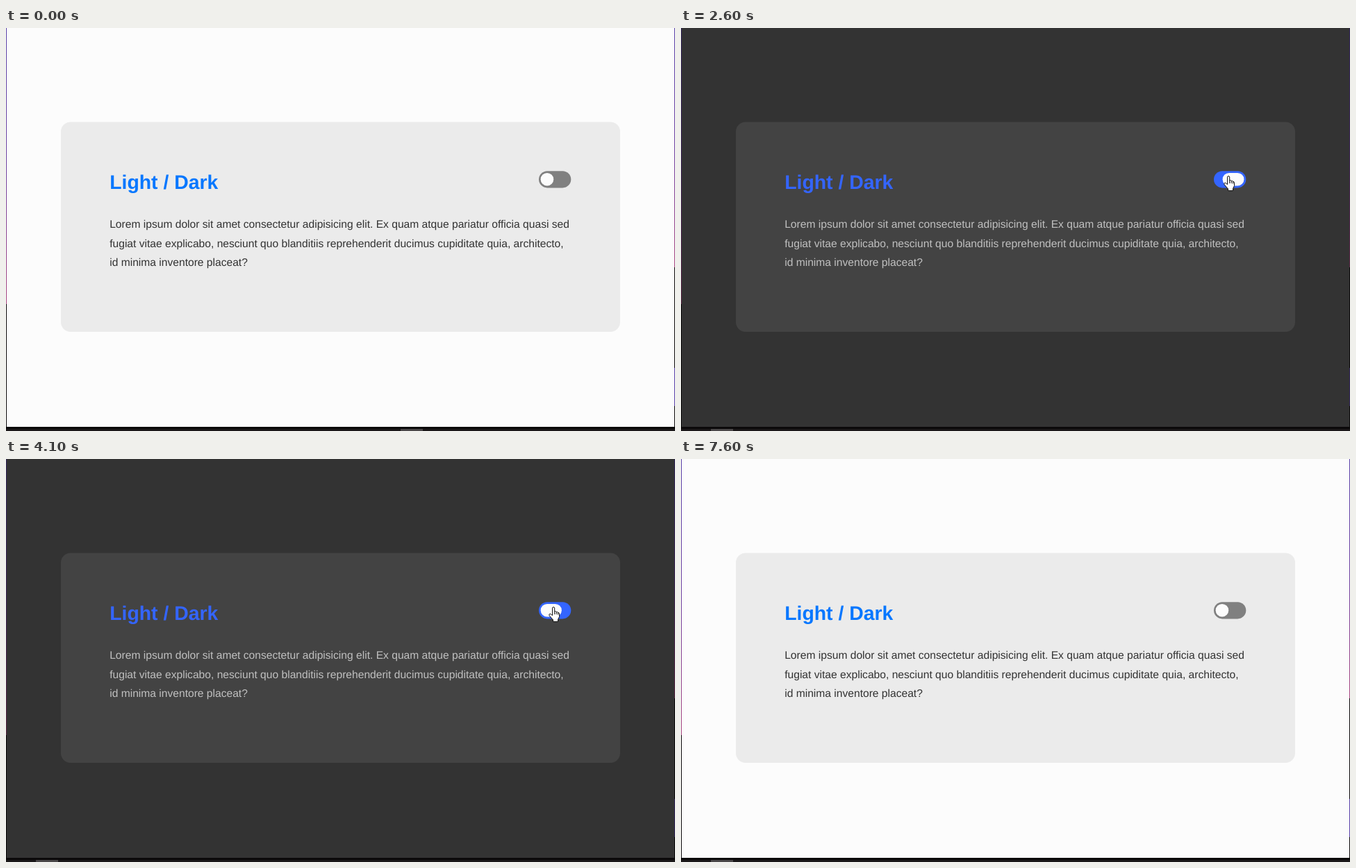
Recreate the animation shown at these times as an HTML page. Size 963 by 581 pixels, loop 7700 ms.

```html
<!DOCTYPE html>
<html lang="en">
<head>
<meta charset="utf-8">
<title>Light / Dark</title>
<style>
  html, body { margin: 0; width: 100%; height: 100%; overflow: hidden; background: #0b090a; }
  svg {
    display: block; width: 963px; height: 581px;
    --page: #fcfcfc; --card: #ebebeb; --title: #0677ff;
    --text: #333; --track: #808080; --edge: .6;
  }
  svg.idle { --edge: 1; }
  svg.dark {
    --page: #333; --card: #434343; --title: #3465ff;
    --text: #c0c0c0; --track: #3465ff; --edge: .5;
  }
  #page { fill: var(--page); }
  #card { fill: var(--card); }
  #track { fill: var(--track); }
  #thumb { fill: #fcfcfc; }
  #edges { opacity: var(--edge); }
  text { font-family: "Liberation Sans", Arial, sans-serif; text-rendering: geometricPrecision; }
  #title { font-size: 28.4px; font-weight: 700; fill: var(--title); }
  #copy { font-size: 15.62px; fill: var(--text); }
  #cursor path { fill: #fff; stroke: #111; stroke-linejoin: round; }
  #cursor .crease { fill: none; }
</style>
</head>
<body>
<svg id="stage" viewBox="0 0 963 581">
  <defs>
    <linearGradient id="glow" x1="0" y1="0" x2="0" y2="1">
      <stop offset="0" stop-color="#5840a8"/>
      <stop offset=".5" stop-color="#6d3fa0"/>
      <stop offset="1" stop-color="#a8447f"/>
    </linearGradient>
  </defs>

  <rect width="963" height="581" fill="#0b090a"/>
  <rect y="578" width="963" height="3" fill="#1b1819"/>
  <rect id="scroll" y="578" width="32" height="3" fill="#4b4849"/>
  <g id="edges" fill="url(#glow)">
    <rect width="1" height="398"/>
    <rect x="962" width="1" height="345"/>
    <rect x="962" y="490" width="1" height="55" fill="#5840a8"/>
  </g>
  <rect id="page" x="1" width="961" height="575"/>

  <rect id="card" x="79" y="135.5" width="805" height="302.5" rx="14"/>
  <text id="title" x="149.2" y="232">Light / Dark</text>
  <g id="copy">
    <text x="149.2" y="288">Lorem ipsum dolor sit amet consectetur adipisicing elit. Ex quam atque pariatur officia quasi sed</text>
    <text x="149.2" y="316">fugiat vitae explicabo, nesciunt quo blanditiis reprehenderit ducimus cupiditate quia, architecto,</text>
    <text x="149.2" y="343">id minima inventore placeat?</text>
  </g>

  <rect id="track" x="767" y="206.2" width="46.3" height="24.2" rx="12.1"/>
  <rect id="thumb" y="208.9" height="18.6" rx="9.3"/>

  <g id="cursor">
    <g id="hand" transform="translate(-7 0)">
      <path d="M5.5 2.2Q5.5.5 7.1.5T8.7 2.2V6.8Q10.8 6 11.2 7.5Q13.2 6.8 13.6 8.5Q15.5 8.2 15.5 10V14.5L13.5 18.6V21.5H6.5V19L1.2 12.9Q0 10.8 1.9 10.2Q3.2 10 5.5 12.6Z"/>
      <path class="crease" d="M8.7 6.8V11M11.2 7.5V11M13.6 8.5V11.5"/>
    </g>
    <path id="arrow" d="M.5.5V16.5L4.2 13L6.6 18.5L9 17.5L6.6 12.2H11.5Z"/>
  </g>
</svg>
<script>
  const LOOP = 7700, STEP = 100;
  const RELEASES = [1390, 2610, 4090, 5410];  // each click flips the theme
  const ENTER = { x: 924, y: 187 }, REST = { x: 788, y: 213 }, EXIT = { x: 948, y: 164 };
  const THUMB = { left: 769.6, room: 40.8, size: 18.6, stretch: 12.2 };

  const $ = id => document.getElementById(id);
  const stage = $("stage"), thumb = $("thumb"), cursor = $("cursor");

  const clamp = u => Math.min(1, Math.max(0, u));
  const progress = (t, start, duration) => clamp((t - start) / duration);
  const smooth = u => u * u * (3 - 2 * u);
  const mix = (a, b, u) => a + (b - a) * u;
  const show = (el, on) => { el.style.display = on ? "" : "none"; };

  // The thumb widens while pressed and shrinks back after the release
  const squeeze = since => clamp(since < 0 ? 1 - (since / 100) ** 4 : 1 - since / 200);

  function drawToggle(t) {
    const done = RELEASES.filter(r => r <= t);
    const dark = done.length % 2 === 1;
    const slide = done.length ? smooth(progress(t, done.at(-1), 250)) : 1;
    const place = dark ? slide : 1 - slide;
    const width = THUMB.size + THUMB.stretch * Math.max(...RELEASES.map(r => squeeze(t - r)));

    thumb.setAttribute("x", THUMB.left + place * (THUMB.room - width));
    thumb.setAttribute("width", width);
    stage.classList.toggle("dark", dark);
    $("scroll").setAttribute("x", done.length ? 43 : 568);
  }

  function drawCursor(t) {
    const arrive = progress(t, 300, 700), leave = progress(t, 6500, 300) ** 2;
    const [x, y] = ["x", "y"].map(k => mix(mix(ENTER[k], REST[k], arrive), EXIT[k], leave));
    const overToggle = x < 813 && y > 206;

    cursor.setAttribute("transform", `translate(${Math.round(x)} ${Math.round(y)})`);
    show(cursor, t >= 300 && t < 6900);
    show($("hand"), overToggle);
    show($("arrow"), !overToggle);
  }

  function draw(time) {
    const t = Math.floor((time % LOOP) / STEP + 0.001) * STEP;
    stage.classList.toggle("idle", t < 1300 || t >= 7600);
    drawToggle(t);
    drawCursor(t);
  }

  let start;
  function tick(now) {
    start ??= now;
    draw(now - start);
    requestAnimationFrame(tick);
  }
  draw(0);
  requestAnimationFrame(tick);
</script>
</body>
</html>
```
